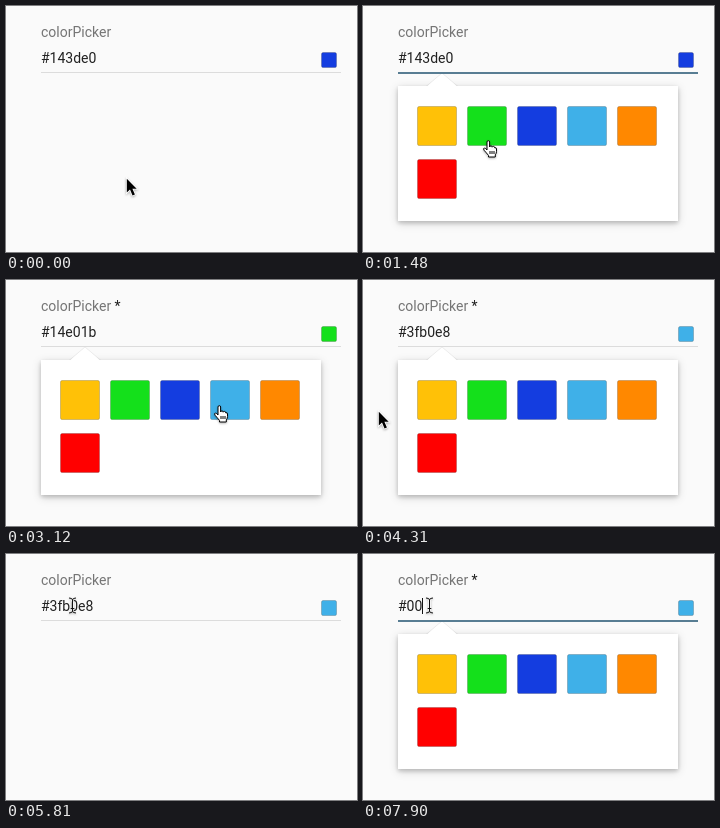
Recreate the animation shown at these times as an HTML page. Size 351 px wide and 246 px high, loop 8 s.

```html
<!DOCTYPE html>
<html lang="en">
<head>
<meta charset="utf-8">
<title>Color picker</title>
<style>
  html, body { margin: 0; width: 100%; height: 100%; overflow: hidden; background: #fafafa; }
  svg { display: block; }
  text { font: 14px Roboto, sans-serif; white-space: pre; fill: #212121; }
  .label { fill: #757575; }
  .swatch { stroke: rgba(0, 0, 0, .18); }
  .panel { filter: drop-shadow(0 2px 2px rgba(0, 0, 0, .18)) drop-shadow(0 2px 4px rgba(0, 0, 0, .16)); }
  .cursor { filter: drop-shadow(0 1px 1px rgba(0, 0, 0, .3)); }
</style>
</head>
<body>
<svg width="351" height="246" viewBox="0 0 351 246">
  <text x="35" y="31"><tspan class="label">colorPicker</tspan><tspan id="star"> *</tspan></text>
  <rect id="selection" x="43.6" y="44" width="43.6" height="16" fill="#b3d7fe"/>
  <text id="value" x="35" y="57"></text>
  <rect id="caret" y="44" width="1" height="16" fill="#111"/>
  <rect id="chip" class="swatch" x="315.5" y="46.5" width="15" height="15" rx="1.5"/>
  <g id="popup">
    <path d="M63 80.5 79 67l16 13.5" fill="#fff" stroke="#ececec"/>
    <rect class="panel" x="35" y="80" width="280" height="135" fill="#fff"/>
    <path d="M64 80.5 79 68l15 12.5z" fill="#fff"/>
    <g id="palette"></g>
  </g>
  <rect id="line" x="35" y="66" width="300"/>
  <g id="cursor" class="cursor">
    <path id="arrow" d="M.8.8V14.6l3.2-3 2.5 5.8 2.4-1-2.5-5.7h4.3z" stroke="#fff" stroke-width="1.6" paint-order="stroke"/>
    <path id="hand" fill="#fff" stroke="#000" d="M4 10V2Q4 .7 5.3.7T6.6 2V7Q6.8 5.8 8 5.9T9.2 7.2Q9.5 6.2 10.6 6.4T11.7 7.8Q13.5 7.2 13.5 9V11.5Q13.4 13.5 12.3 14.8V17H5.5V15.4Q3.5 13 1 10.2 0 8.4 1.3 8 2.6 8 4 10zM7 11v3m2-3v3m2-3v3"/>
    <g id="beam" fill="none">
      <path d="M0-6V6" stroke="#fff" stroke-width="2.4"/>
      <path d="M-3.5-7.5Q0-7.5 0-5.5V5.5Q0 7.5-3.5 7.5M3.5-7.5Q0-7.5 0-5.5M0 5.5Q0 7.5 3.5 7.5M-1.8 3h3.6" stroke="#111"/>
    </g>
  </g>
</svg>
<script>
const LOOP = 8000;
const $ = id => document.getElementById(id);
const show = (id, on) => $(id).setAttribute('visibility', on ? 'inherit' : 'hidden');

const palette = ['#ffc107', '#14e01b', '#143de0', '#3fb0e8', '#ff8800', '#ff0000'];
$('palette').innerHTML = palette.map((color, i) =>
  `<rect class="swatch" x="${54.5 + i % 5 * 50}" y="${100.5 + Math.floor(i / 5) * 53}"
    width="39" height="39" rx="1.5" fill="${color}"/>`).join('');

const point = (cursor, x, y) => ({ cursor, x, y });
const pick = color => ({ value: color, chip: color, dirty: true });
const type = value => ({ value, caret: true, selected: false, dirty: true });

// Each step changes part of the state at its time in ms.
const steps = [
  [0, { ...pick('#143de0'), ...point('arrow', 120, 172), dirty: false,
        open: false, focused: false, selected: false, caret: false }],
  [150, point('arrow', 121, 150)],
  [300, point('arrow', 114, 100)],
  [440, point('beam', 104, 56)],
  [590, point('beam', 102.5, 51)],
  [890, { open: true, focused: true }],
  [1180, point('arrow', 92, 82)],
  [1330, point('hand', 113, 118)],
  [1480, point('hand', 120, 134)],
  [1770, pick('#14e01b')],
  [1920, { focused: false }],
  [2370, point('hand', 163, 131)],
  [2520, point('hand', 222, 126)],
  [2670, point('hand', 253, 124)],
  [2970, point('hand', 225, 124)],
  [3120, point('hand', 208, 125)],
  [3570, pick('#3fb0e8')],
  [3870, point('hand', 168, 126)],
  [4020, point('hand', 104, 128)],
  [4170, point('arrow', 42, 130)],
  [4310, point('arrow', 15, 131)],
  [4610, { open: false }],
  [5060, { dirty: false }],
  [5210, point('arrow', 20, 120)],
  [5360, point('arrow', 37, 90)],
  [5510, point('beam', 57, 60)],
  [5660, point('beam', 65, 53)],
  [5810, point('beam', 66.5, 51.5)],
  [6110, { open: true, focused: true }],
  [6250, { selected: true }],
  [7750, type('#0')],
  [7900, type('#00')]
];

const stateAt = time =>
  Object.assign({}, ...steps.filter(([start]) => start <= time).map(([, change]) => change));

function render(s) {
  $('value').textContent = s.value;
  $('chip').setAttribute('fill', s.chip);
  show('star', s.dirty);
  show('popup', s.open);
  show('selection', s.selected);
  show('caret', s.caret);
  if (s.caret) $('caret').setAttribute('x', Math.round(35 + $('value').getComputedTextLength()));
  $('line').setAttribute('height', s.focused ? 2 : 1);
  $('line').setAttribute('fill', s.focused ? '#587d93' : '#dcdcdc');
  for (const kind of ['arrow', 'hand', 'beam']) show(kind, kind === s.cursor);
  $('cursor').setAttribute('transform', `translate(${s.x} ${s.y})`);
}

const origin = performance.now();
function tick() {
  render(stateAt((performance.now() - origin) % LOOP));
  requestAnimationFrame(tick);
}
tick();
</script>
</body>
</html>
```
